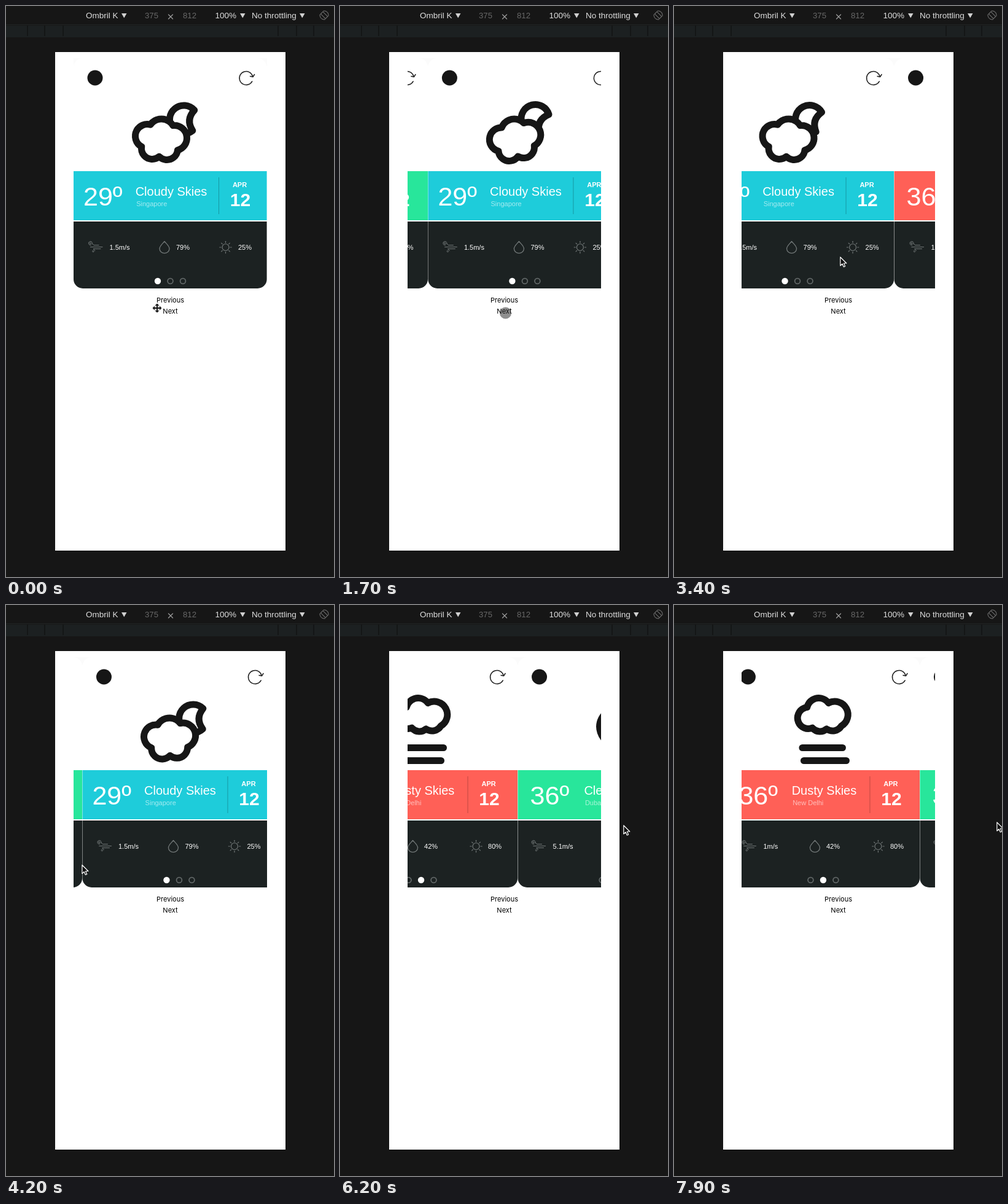
Animation, 534 px wide and 930 px high, one loop 8 s. Source, as an HTML page with a canvas:

```html
<!DOCTYPE html>
<html lang="en">
<head>
<meta charset="utf-8">
<title>Weather carousel</title>
<style>
html, body { margin: 0; width: 100%; height: 100%; overflow: hidden; background: #161616; }
canvas { display: block; width: 534px; height: 930px; }
</style>
</head>
<body>
<canvas id="stage"></canvas>
<script>
const W = 534, H = 930, LOOP = 8000, STEP = 100, CARD = 315;
const INK = '#161616', DARK = '#1c2222', TAU = Math.PI * 2;
const SANS = '"Liberation Sans", Arial, sans-serif';
const UI = 'Inter, Roboto, sans-serif';

const canvas = document.getElementById('stage');
const ctx = canvas.getContext('2d');
const dpr = window.devicePixelRatio || 1;
canvas.width = W * dpr;
canvas.height = H * dpr;

const cards = [
  { color: '#1eccda', temp: '29º', tempX: 16, sky: 'Cloudy Skies', city: 'Singapore', date: 270.5,
    icons: [24, 148, 247.5], stats: ['1.5m/s', '79%', '25%'], statX: [58.5, 167, 268], art: cloudMoon },
  { color: '#ff6057', temp: '36º', tempX: 20, sky: 'Dusty Skies', city: 'New Delhi', date: 267.5,
    icons: [25, 144, 247], stats: ['1m/s', '42%', '80%'], statX: [60, 162.5, 266.5], art: dustCloud },
  { color: '#28e69b', temp: '36º', tempX: 20, sky: 'Clear Skies', city: 'Dubai', date: 267.5,
    icons: [22, 147, 241], stats: ['5.1m/s', '22%', '100%'], statX: [57, 166, 263], art: clearMoon }
];

// Ease curve as a Bezier in x (time) and y (progress)
const easeX = s => 0.75 * s * (1 - s) + s ** 3;
const easeY = s => 0.3 * s * (1 - s) ** 2 + 3 * (1 - s) * s * s + s ** 3;
const MOVE = 0.9;

function solve(fn, v) {
  let lo = 0, hi = 1;
  for (let i = 0; i < 30; i++) {
    const mid = (lo + hi) / 2;
    if (fn(mid) < v) lo = mid; else hi = mid;
  }
  return (lo + hi) / 2;
}

function toSlide(phase) {
  const n = Math.floor(phase), u = Math.min(1, (phase - n) / MOVE);
  return n + (u >= 1 ? 1 : easeY(solve(easeX, u)));
}

function toPhase(slide) {
  const n = Math.floor(slide);
  return n + MOVE * easeX(solve(easeY, slide - n));
}

const pace = [[0, 0], [1700, 5.894], [3400, 12.211], [5100, 17.84], [6200, 22.43], [6800, 24.206], [7900, 28.078]]
  .map(([t, s]) => [t, toPhase(s)]);

const touchPath = [[100, 250, 506], [500, 262, 509], [900, 269.5, 500], [1800, 269.5, 500], [2300, 268, 507], [2800, 269, 507]];
const arrowPath = [[2800, 270, 492], [3400, 270, 408], [3600, 100, 418], [3700, 95, 420], [4500, 140, 424],
  [5100, 206, 414], [5500, 300, 394], [6200, 461, 358], [6800, 492, 351], [7900, 525, 353]];

// Values at time t along a list of [time, ...values]
function along(path, t) {
  let i = 1;
  while (i < path.length - 1 && path[i][0] < t) i++;
  const a = path[i - 1], b = path[i];
  const k = Math.max(0, (t - a[0]) / (b[0] - a[0]));
  return a.slice(1).map((v, j) => v + (b[j + 1] - v) * k);
}

function rect(x, y, w, h, fill) {
  ctx.fillStyle = fill;
  ctx.fillRect(x, y, w, h);
}

function text(str, x, y, size, fill, opt = {}) {
  ctx.font = `${opt.weight || 400} ${size}px ${opt.family || SANS}`;
  ctx.textAlign = opt.align || 'left';
  ctx.fillStyle = fill;
  ctx.fillText(str, x, y);
}

function disc(x, y, r, fill) {
  ctx.beginPath();
  ctx.arc(x, y, r, 0, TAU);
  ctx.fillStyle = fill;
  ctx.fill();
}

function pen(color, width) {
  ctx.strokeStyle = color;
  ctx.lineWidth = width;
  ctx.lineCap = ctx.lineJoin = 'round';
}

function line(...pts) {
  ctx.beginPath();
  for (let i = 0; i < pts.length; i += 2) ctx.lineTo(pts[i], pts[i + 1]);
  ctx.stroke();
}

function ring(x, y, r, from = 0, to = TAU) {
  ctx.beginPath();
  ctx.arc(x, y, r, from, to);
  ctx.stroke();
}

function at(x, y, angle, draw) {
  ctx.save();
  ctx.translate(x, y);
  ctx.rotate(angle);
  draw();
  ctx.restore();
}

function outline() {
  pen(INK, 11);
  ctx.closePath();
  ctx.fillStyle = '#fff';
  ctx.fill();
  ctx.stroke();
}

// Outer crossing of two neighbouring circles, going clockwise
function meet([ax, ay, ar], [bx, by, br]) {
  const dx = bx - ax, dy = by - ay, d = Math.hypot(dx, dy);
  const k = (ar * ar - br * br + d * d) / (2 * d);
  const h = Math.sqrt(ar * ar - k * k);
  return [ax + (dx * k + dy * h) / d, ay + (dy * k - dx * h) / d];
}

// Cloud edge made of arcs; puffs run clockwise
function cloud(puffs) {
  const n = puffs.length;
  ctx.beginPath();
  puffs.forEach((p, i) => {
    const [x, y, r] = p;
    const [x0, y0] = meet(puffs[(i + n - 1) % n], p);
    const [x1, y1] = meet(p, puffs[(i + 1) % n]);
    ctx.arc(x, y, r, Math.atan2(y0 - y, x0 - x), Math.atan2(y1 - y, x1 - x));
  });
  outline();
}

// Crescent hanging from a pivot above its centre
function moon(x, y, r, t) {
  const tilt = (5 + 25 * Math.sin(TAU * t / LOOP)) * Math.PI / 180;
  at(x, y, tilt, () => {
    const a = 0.81;
    ctx.beginPath();
    ctx.arc(0, 12, r, a, TAU - a);
    ctx.quadraticCurveTo(r * 0.12, 12, r * Math.cos(a), 12 + r * Math.sin(a));
    outline();
  });
}

function cloudMoon(t) {
  moon(180.5, 173, 23, t);
  const turn = -7 * (1 - Math.cos(TAU * t / 3400)) * Math.PI / 180;
  at(142, 217, turn, () => cloud([[-22, -5, 19.5], [1, -11, 22], [22, -2, 20.5], [10, 16, 17.5], [-14, 15, 17.5]]));
}

function dustCloud(t) {
  const sway = 2.5 * Math.cos(TAU * (t - 6200) / 3400);
  at(1 + sway / 2, 0, 0, () =>
    cloud([[133.5, 184, 17.5], [150.5, 171, 19.5], [176.5, 178.5, 21.5], [173, 188, 17], [152.5, 190, 16]]));
  pen(INK, 11);
  line(126 + sway, 232.5, 191.5 + sway, 232.5);
  line(123.5 - sway, 253.5, 192.5 - sway, 253.5);
}

function clearMoon(t) {
  moon(158, 187, 29, t);
}

function windIcon(x) {
  pen('#737979', 1);
  line(x + 9, 389.5, x + 17, 389.5);
  line(x + 3, 392.5, x + 23, 392.5);
  line(x + 8, 395.5, x + 20, 395.5);
  for (const [cx, cy, dir] of [[3.5, 386.5, 1], [8, 399.5, -1]]) {
    ring(x + cx, cy, 3, dir * 1.3, dir * 6.6);
    ring(x + cx, cy, 1.2, 0, 5);
  }
  line(x + 6.5, 387, x + 9, 389.5);
}

function dropIcon(x) {
  pen('#737979', 1.3);
  ctx.beginPath();
  ctx.moveTo(x, 383.5);
  ctx.bezierCurveTo(x + 4, 388, x + 8, 391, x + 8, 395.5);
  ctx.bezierCurveTo(x + 7.5, 405, x - 7.5, 405, x - 8, 395.5);
  ctx.bezierCurveTo(x - 8, 391, x - 4, 388, x, 383.5);
  ctx.stroke();
}

function sunIcon(x) {
  pen('#737979', 1.2);
  ring(x, 393, 5.5);
  for (let i = 0; i < 8; i++) {
    at(x, 393, i * TAU / 8, () => line(7.5, 0, 9.7, 0));
  }
}

function refreshIcon(x, y) {
  pen('#222', 1.5);
  ring(x, y, 11, 0.5, TAU - 0.28);
  line(x + 6.5, y - 3, x + 11, y - 2, x + 13.5, y - 6);
}

function card(index, x, t) {
  const c = cards[index], w = CARD - 0.4;
  ctx.save();
  ctx.translate(x, 0);
  ctx.beginPath();
  ctx.roundRect(0, 85, w, 375, 15);
  ctx.fillStyle = '#fff';
  ctx.fill();

  disc(35, 117, 12.5, INK);
  refreshIcon(281, 117.5);
  c.art(t);

  rect(0, 269, w, 80, c.color);
  text(c.temp, c.tempX, 325, 43, '#fff');
  text(c.sky, 159, 309, 20, '#fff', { align: 'center' });
  const left = 159 - ctx.measureText(c.sky).width / 2;
  text(c.city, left + 1.5, 326, 11, 'rgba(255,255,255,.6)');
  rect(c.date - 34.5, 279, 1, 60, 'rgba(0,0,0,.25)');
  text('APR', c.date, 295, 11, '#fff', { weight: 700, align: 'center' });
  text('12', c.date + 1, 326, 30, '#fff', { weight: 700, align: 'center' });

  ctx.beginPath();
  ctx.roundRect(0, 351, w, 109, [0, 0, 15, 15]);
  ctx.fillStyle = DARK;
  ctx.fill();
  windIcon(c.icons[0]);
  dropIcon(c.icons[1]);
  sunIcon(c.icons[2]);
  c.stats.forEach((s, i) => text(s, c.statX[i], 397, 11, '#fff'));

  for (let i = 0; i < 3; i++) {
    const dx = 137 + i * 20.5;
    if (i === index) {
      disc(dx, 448, 5.2, '#fff');
    } else {
      pen('#606666', 1.8);
      ring(dx, 448, 4.4);
    }
  }
  ctx.restore();
}

function caret(x) {
  ctx.beginPath();
  ctx.moveTo(x, 12);
  ctx.lineTo(x + 8.5, 12);
  ctx.lineTo(x + 4.25, 19.5);
  ctx.fillStyle = '#d0d0d0';
  ctx.fill();
}

function toolbar() {
  rect(0, 0, W, H, INK);
  rect(0, 30, W, 1, '#222525');
  rect(0, 32, W, 19, '#1c2021');
  for (const x of [35, 63, 93, 443, 473, 501]) rect(x - 1, 32, 2, 17, '#141616');
  text('Ombril K', 130, 20, 13.5, '#dedede');
  caret(188);
  text('375', 226, 20, 13.2, '#686868');
  text('812', 288, 20, 13.2, '#686868');
  pen('#999', 1.3);
  line(264.5, 14, 271.5, 21);
  line(271.5, 14, 264.5, 21);
  text('100%', 340.5, 20, 13.5, '#dedede');
  caret(381);
  text('No throttling', 400, 20, 13.5, '#dedede');
  caret(478);
  pen('#777', 1);
  at(518, 15, -TAU / 8, () => {
    ctx.strokeRect(-2.5, -5.5, 5, 11);
    ring(0, 0, 7, -1, 1);
    ring(0, 0, 7, Math.PI - 1, Math.PI + 1);
  });
}

function moveCursor(x, y) {
  for (const [color, width, grow] of [['#fff', 4, 1], [INK, 2, 0]]) {
    for (let i = 0; i < 4; i++) {
      at(x, y, i * TAU / 4, () => {
        pen(color, width);
        line(0, 0, 4, 0);
        ctx.beginPath();
        ctx.moveTo(4 - grow, -3.5 - grow);
        ctx.lineTo(7.5 + grow, 0);
        ctx.lineTo(4 - grow, 3.5 + grow);
        ctx.fillStyle = color;
        ctx.fill();
      });
    }
  }
}

function arrowCursor(x, y) {
  at(x + 0.8, y + 1, 0, () => {
    ctx.beginPath();
    [[0, 0], [0, 14], [3.2, 11], [5.5, 16], [7.8, 15], [5.6, 10], [10, 10]].forEach(p => ctx.lineTo(...p));
    ctx.closePath();
    pen('#fff', 1.2);
    ctx.fillStyle = '#111';
    ctx.fill();
    ctx.stroke();
  });
}

function draw(t) {
  ctx.setTransform(dpr, 0, 0, dpr, 0, 0);
  toolbar();
  rect(80, 75, 375, 812, '#fff');

  const slide = toSlide(along(pace, t)[0]);
  const n = Math.floor(slide), shift = (slide - n) * CARD;
  ctx.save();
  ctx.beginPath();
  ctx.rect(110, 85, CARD, 375);
  ctx.clip();
  rect(110, 85, CARD, 12, '#fbfbfb');
  card(n % 3, 110 - shift, t);
  if (shift > 0) card((n + 1) % 3, 110 - shift + CARD, t);
  ctx.restore();

  text('Previous', 267.5, 483, 11, '#000', { family: UI, align: 'center' });
  text('Next', 267.5, 501, 11, '#000', { family: UI, align: 'center' });

  if (t < 100) moveCursor(246, 492);
  else if (t < 2800) disc(...along(touchPath, t), 9.5, 'rgba(40,40,40,.52)');
  else arrowCursor(...along(arrowPath, t));
}

// The picture advances ten times a second
const start = performance.now();
function tick() {
  const beat = Math.floor((performance.now() - start) / STEP + 0.1);
  draw(beat * STEP % LOOP);
  requestAnimationFrame(tick);
}
tick();
</script>
</body>
</html>
```
